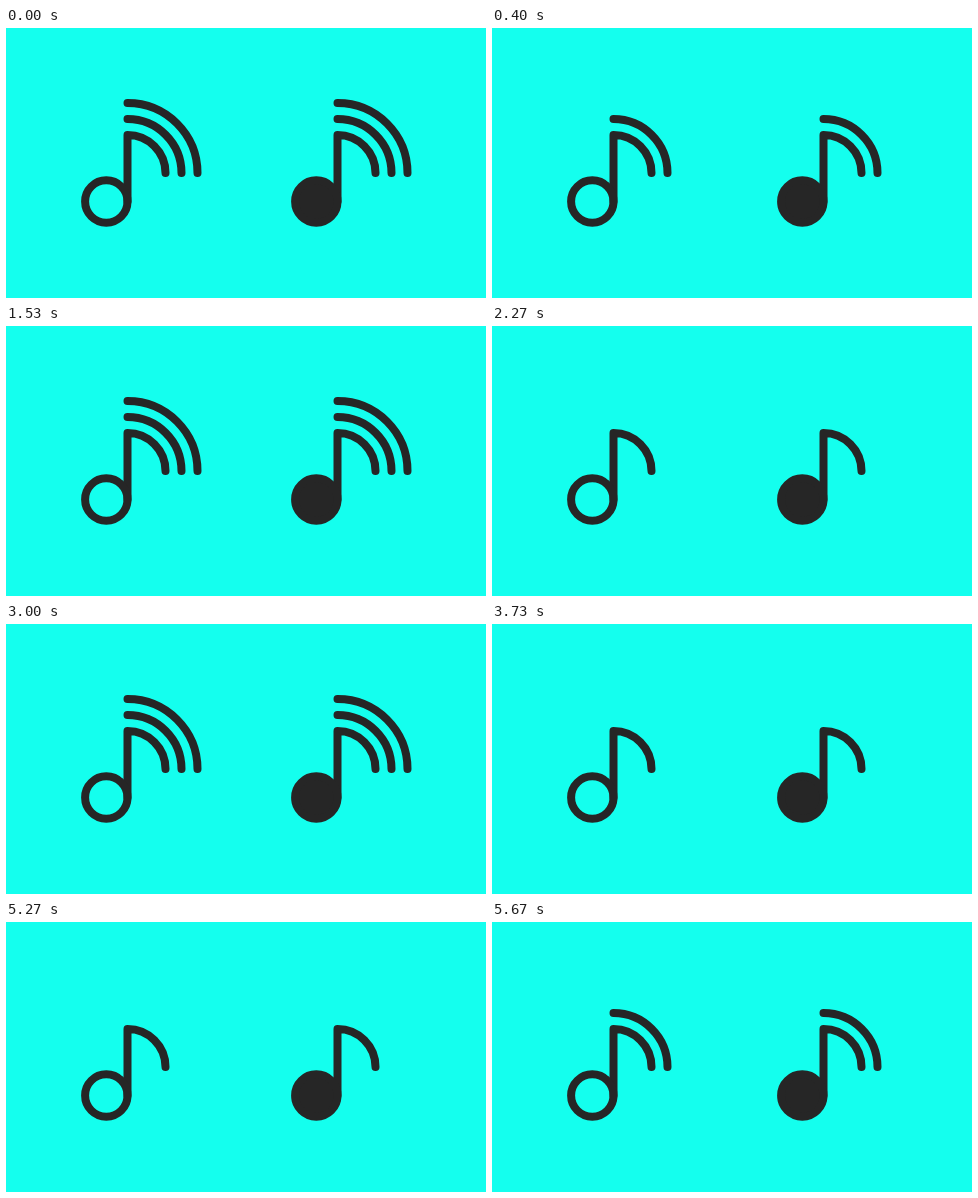
Animation of 480x270 px, one loop 5990 ms. Source, as an HTML page:

```html
<!DOCTYPE html>
<html lang="en">
<head>
<meta charset="utf-8">
<title>Music note signal</title>
<style>
  html, body { margin: 0; width: 100%; height: 100%; overflow: hidden; background: #14ffee; }
  svg { display: block; width: 480px; height: 270px; }
  g { fill: none; stroke: #262626; stroke-width: 8; stroke-linecap: round; stroke-linejoin: round; }
  .solid { fill: #262626; }
</style>
</head>
<body>
<svg viewBox="0 0 480 270">
  <defs>
    <g id="note">
      <path d="M121.5 173.5V107A38 38 0 0 1 159.5 145"/>
      <path class="middle" d="M121.5 91A54 54 0 0 1 175.5 145"/>
      <path class="outer" d="M121.5 75A70 70 0 0 1 191.5 145"/>
    </g>
  </defs>
  <g>
    <use href="#note"/>
    <circle cx="100.3" cy="173.5" r="21.2"/>
  </g>
  <g transform="translate(210)">
    <use href="#note"/>
    <circle class="solid" cx="100.3" cy="173.5" r="21.2"/>
  </g>
</svg>
<script>
  const LOOP = 5990;
  // Each switch time moves one step through the cycle of visible arcs.
  const switches = [400, 730, 1130, 1530, 1870, 2270, 2670, 3000, 3400, 3730, 4130, 4530, 4870, 5270, 5670];
  const arcCounts = [3, 2, 1, 2];
  const middle = document.querySelector('.middle');
  const outer = document.querySelector('.outer');
  const show = (arc, on) => arc.setAttribute('visibility', on ? 'visible' : 'hidden');

  function draw() {
    const time = performance.now() % LOOP;
    const step = switches.filter(t => t <= time).length;
    const count = arcCounts[step % arcCounts.length];
    show(middle, count > 1);
    show(outer, count > 2);
    requestAnimationFrame(draw);
  }
  draw();
</script>
</body>
</html>
```
